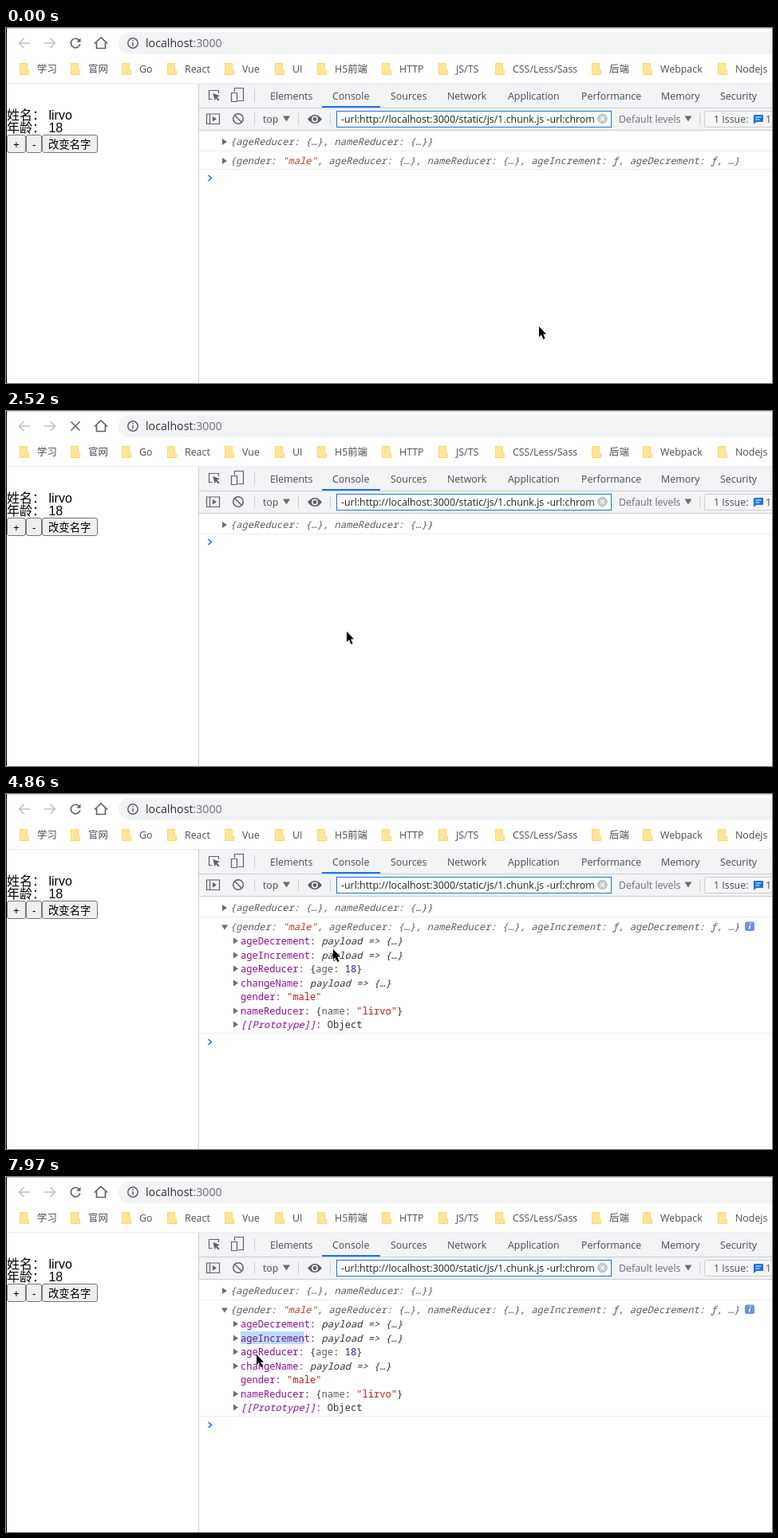
Write an HTML page that moves like this. It is 960 px wide and 446 px high and loops after 8000 ms.

```html
<!DOCTYPE html>
<html lang="zh-CN">
<head>
<meta charset="utf-8">
<title>Console</title>
<style>
html, body { margin: 0; width: 100%; height: 100%; overflow: hidden; background: #fff; }
svg { display: block; width: 960px; height: 446px; }
text { font: 12.4px "Open Sans", "Noto Sans CJK SC", "Noto Sans CJK JP", sans-serif; fill: #4a4d51; white-space: pre; }
.url { font-size: 14.2px; fill: #303236; }
.soft { fill: #6b6f74; }
.input { fill: #222; }
.page { font: 16px "Liberation Sans", "Noto Sans CJK SC", "Noto Sans CJK JP", sans-serif; fill: #000; }
.button { font-size: 13.33px; }
.code { font: 12.1px "Noto Sans Mono", monospace; fill: #303236; }
.i { font-style: italic; }
.g { fill: #5a5d61; }
.k { fill: #881391; }
.s { fill: #c41a16; }
.n { fill: #1c1b8a; }
.q { fill: #b5432a; }
.line { fill: none; stroke: #5f6368; stroke-width: 1.5; }
.thin { stroke-width: 1.2; }
.solid { fill: #5f6368; stroke: none; }
.off { stroke: #bdc1c6; }
.border { stroke: #cbcdd1; }
.rule { stroke: #ededed; }
.tri { fill: #6e6e6e; }
</style>
</head>
<body>
<svg viewBox="0 0 960 446">
  <path class="border" d="M0 .5H960"/>
  <rect x="141" y="5" width="850" height="28" rx="14" fill="#f1f3f4"/>
  <circle id="hover" cx="87" cy="19" r="14" fill="#dfe1e3"/>
  <g class="line">
    <path class="off" d="M30 19H17M22.500 13L16.500 19L22.500 25M48 19H61M55.500 13L61.500 19L55.500 25"/>
    <g id="reload">
      <path d="M91.500 15.200A5.800 5.800 0 1 0 92.800 20.500" stroke-width="1.700"/>
      <path class="solid" d="M93.500 12.500V17.700H88.300Z"/>
    </g>
    <path id="stop" d="M81.500 13.500L92.500 24.500M92.500 13.500L81.500 24.500"/>
    <path d="M111 19.500L119 12L127 19.500M113.500 18V25.500H124.500V18" stroke-width="1.700"/>
    <circle cx="159" cy="19" r="6.200"/>
    <path d="M159 18V22.500M159 15V16.500"/>
  </g>
  <text class="url" x="175" y="24">localhost<tspan class="soft">:3000</tspan></text>
  <g id="bookmarks"></g>

  <path d="M.5 0V446" stroke="#000"/>
  <text class="page" x="1" y="115">姓名： lirvo</text>
  <text class="page" x="1" y="131">年龄： 18</text>
  <g id="buttons"></g>

  <rect x="242" y="70" width="718" height="58" fill="#f1f3f4"/>
  <path class="rule" d="M1 69.500H960"/>
  <path class="border" d="M241.500 70V446M242 100.500H960M242 128.500H960M311.500 77V93M311.500 107V122M366.500 107V122M406.500 107V122M869.500 107V122"/>
  <rect x="396" y="98" width="73" height="2" fill="#1a73e8"/>
  <g id="tabs"></g>
  <g class="line thin">
    <path d="M258.500 89.500H254.500V78.500H266.500V82"/>
    <path class="solid" d="M259.500 82L268 85.200L264.500 86.800L267.500 90.200L266 91.500L263 88.200L261.500 91.500Z"/>
    <path d="M286.500 80V75.500H297.500V91.500H291M282.500 81.500H289.500V92.500H282.500Z"/>
    <path d="M251.500 108H267.500V120.500H251.500ZM255.500 108V120.500"/>
    <path class="solid" d="M259 111L264 114.200L259 117.500Z"/>
    <g stroke-width="1.500">
      <circle cx="291" cy="114" r="6.300"/>
      <path d="M286.500 109.500L295.500 118.500"/>
    </g>
    <path class="solid" d="M378 114.500Q387 103.500 396 114.500Q387 125.500 378 114.500Z"/>
    <circle cx="387" cy="114.500" r="3.200" stroke="#f1f3f4" stroke-width="1.500" fill="#5f6368"/>
  </g>
  <text x="322" y="119">top</text>
  <path class="tri" d="M347 110.500H356L351.500 117.500ZM850.500 110.500H859.500L855 117.500Z"/>
  <rect x="414.500" y="104.500" width="344" height="20" fill="#fff" stroke="#1a73e8"/>
  <text class="input" x="420" y="119">-url:http://localhost:3000/static/js/1.chunk.js -url:chrom</text>
  <circle cx="747.500" cy="114" r="6.500" fill="#c5c8cc"/>
  <path d="M745 111.500L750 116.500M750 111.500L745 116.500" stroke="#fff" stroke-width="1.300"/>
  <text class="soft" x="768" y="119">Default levels</text>
  <g id="issue">
    <rect x="875.500" y="104.500" width="94" height="20" rx="2" fill="#f4f5f6" class="border"/>
    <text x="887" y="119">1 Issue:</text>
    <path d="M938 109H948Q949 109 949 110V117Q949 118 948 118H940.500L937 121V110Q937 109 938 109Z" fill="#1a73e8"/>
    <path d="M939.500 112H946.500M939.500 115H944.500" stroke="#fff"/>
    <text x="952" y="119">1</text>
  </g>
  <g id="noIssue">
    <rect x="888.500" y="104.500" width="81" height="20" rx="2" fill="#f4f5f6" class="border"/>
    <text x="900" y="119">No Issues</text>
  </g>

  <rect id="selection" x="294" height="16" fill="#b9dcfb"/>
  <g id="first"></g>
  <g id="second"></g>
  <g id="closed"></g>
  <g id="open"></g>
  <path id="prompt" d="M253.500 -3.500L257.500 0L253.500 3.500" fill="none" stroke="#1a73e8" stroke-width="1.600"/>
  <circle id="halo" r="11" fill="#f4ea38" opacity=".72"/>
  <path id="cursor" d="M0 0V13.200L3 10.300L5.300 16L7.600 15L5.200 9.500H9Z"/>
</svg>
<script>
const LOOP = 8000, CHAR = 7.26, LEFT = 294;
const $ = id => document.getElementById(id);
const add = (id, markup) => $(id).insertAdjacentHTML('beforeend', markup);
const label = (x, y, str, cls = '') => `<text x="${x}" y="${y}" class="${cls}">${str}</text>`;
const code = (x, y, parts) =>
  label(x, y, parts.map(([cls, str]) => `<tspan class="${cls}">${str}</tspan>`).join(''), 'code');
const right = (x, y) => `<path class="tri" d="M${x} ${y - 4}V${y + 4}L${x + 6} ${y}Z"/>`;
const rule = y => `<path class="rule" d="M242 ${y}H960"/>`;

const bookmarks = { 17: '学习', 81: '官网', 145: 'Go', 202: 'React', 274: 'Vue', 337: 'UI', 390: 'H5前端',
  471: 'HTTP', 542: 'JS/TS', 613: 'CSS/Less/Sass', 734: '后端', 798: 'Webpack', 892: 'Nodejs' };
for (const [x, name] of Object.entries(bookmarks)) {
  add('bookmarks', `<g transform="translate(${x} 44)"><path d="M0 0H10V9H12V15H0Z" fill="#ffe694"/>
    <path d="M.5 .5H9.500V9.500H11.500V14.500H.5Z" fill="none" stroke="#f6d978"/></g>` + label(+x + 22, 56, name));
}

const tabs = { 331: 'Elements', 409: 'Console', 482: 'Sources', 553: 'Network',
  629: 'Application', 721: 'Performance', 821: 'Memory', 895: 'Security' };
for (const [x, name] of Object.entries(tabs)) add('tabs', label(x, 90, name));

for (const [x, w, tx, str] of [[1, 24, 9, '+'], [25, 20, 33, '-'], [45, 70, 53, '改变名字']]) {
  add('buttons', `<rect x="${x + .5}" y="134.500" width="${w - 1}" height="22" rx="2.500" fill="#efefef" stroke="#767676"/>`
    + label(tx, 151, str, 'page button'));
}

add('first', right(271, 143) + rule(154.5) + code(281, 147, [['i g', '{ageReducer: {…}, nameReducer: {…}}']]));
add('second', code(281, 171, [['i g', '{gender: '], ['i q', '"male"'],
  ['i g', ', ageReducer: {…}, nameReducer: {…}, ageIncrement: ƒ, ageDecrement: ƒ, …}']]));
add('closed', right(271, 167) + rule(177.5));

const method = ['i', 'payload =&gt; {…}'];
const props = [
  ['ageDecrement', [method]],
  ['ageIncrement', [method]],
  ['ageReducer', [['', '{'], ['g', 'age'], ['', ': '], ['n', '18'], ['', '}']]],
  ['changeName', [method]],
  ['gender', [['s', '"male"']]],
  ['nameReducer', [['', '{'], ['g', 'name'], ['', ': '], ['s', '"lirvo"'], ['', '}']]],
  ['[[Prototype]]', [['', 'Object']]]
];
add('open', `<path class="tri" d="M270 164.500H278L274 170.500Z"/>
  <rect x="926" y="160.500" width="12" height="11.500" rx="2.500" fill="#6e90e4"/>
  <path d="M932.500 165L931.500 169.500M933 162.300L932.800 163.500" stroke="#fff" stroke-width="1.600"/>` + rule(300.5));
props.forEach(([name, value], i) => {
  const y = Math.round(185 + i * 17.55);
  const key = name[0] === '[' ? 'i k' : 'k';
  add('open', (name === 'gender' ? '' : right(285, y - .5))
    + code(LEFT, y + 4, [[key, name], ['', ': '], ...value]));
});

// time, x, y of the pointer tip
const path = [
  [0, 668, 375], [70, 668, 375], [70, 382, 238], [250, 380, 236], [1020, 91, 22], [1160, 91, 22],
  [1230, 114, 41], [1370, 150, 70], [1750, 428, 284], [1910, 428, 284], [1970, 427, 277],
  [2870, 427, 277], [3400, 273, 168], [3750, 273, 168], [4080, 301, 192], [4370, 301, 192],
  [4600, 350, 211], [4800, 437, 197], [5120, 294, 184], [5320, 294, 184], [5600, 365, 187],
  [5940, 376, 187], [6520, 376, 187], [7200, 298, 204], [7360, 297, 203], [7640, 376, 203],
  [7710, 376, 205], [7950, 314, 223], [LOOP, 314, 223]
];
const presses = [[1090, 1230], [3610, 3750], [5190, 6520], [7360, 7700]];

const clamp = (v, lo, hi) => Math.min(hi, Math.max(lo, v));
const within = (t, from, to) => t >= from && t < to;
const show = (id, on) => $(id).style.visibility = on ? 'visible' : 'hidden';

function pointer(t) {
  const i = path.findIndex(p => p[0] > t);
  const [t0, x0, y0] = path[i - 1], [t1, x1, y1] = path[i];
  const k = (t - t0) / (t1 - t0);
  return [x0 + (x1 - x0) * k, y0 + (y1 - y0) * k];
}

function select(t) {
  const again = t >= 7360;
  const start = again ? 7360 : 5320, end = again ? 7640 : 5940;
  const chars = clamp(Math.round((pointer(clamp(t, start, end))[0] - LEFT) / CHAR), 0, 11);
  $('selection').setAttribute('y', again ? 194 : 177);
  $('selection').setAttribute('width', t < start ? 0 : chars * CHAR);
}

function render(t) {
  const move = `translate(${pointer(t).map(v => Math.round(v))})`;
  $('cursor').setAttribute('transform', move);
  $('halo').setAttribute('transform', move);
  show('halo', presses.some(([from, to]) => within(t, from, to)));

  const loading = within(t, 1370, 2870);
  show('stop', loading);
  show('reload', !loading);
  $('hover').style.opacity = t < 2180 ? clamp((t - 960) / 200, 0, 1) : 0;

  const noIssue = within(t, 1910, 2250);
  show('noIssue', noIssue);
  show('issue', !noIssue);

  const hasFirst = !within(t, 1910, 2520), hasSecond = !within(t, 1910, 2590), open = t >= 3680;
  show('first', hasFirst);
  show('second', hasSecond);
  show('closed', hasSecond && !open);
  show('open', open);
  const promptY = open ? 311.5 : hasSecond ? 188.5 : hasFirst ? 164.5 : 140.5;
  $('prompt').setAttribute('transform', `translate(0 ${promptY})`);
  select(t);
}

const begin = performance.now();
function frame() {
  render((performance.now() - begin) % LOOP);
  requestAnimationFrame(frame);
}
frame();
</script>
</body>
</html>
```
